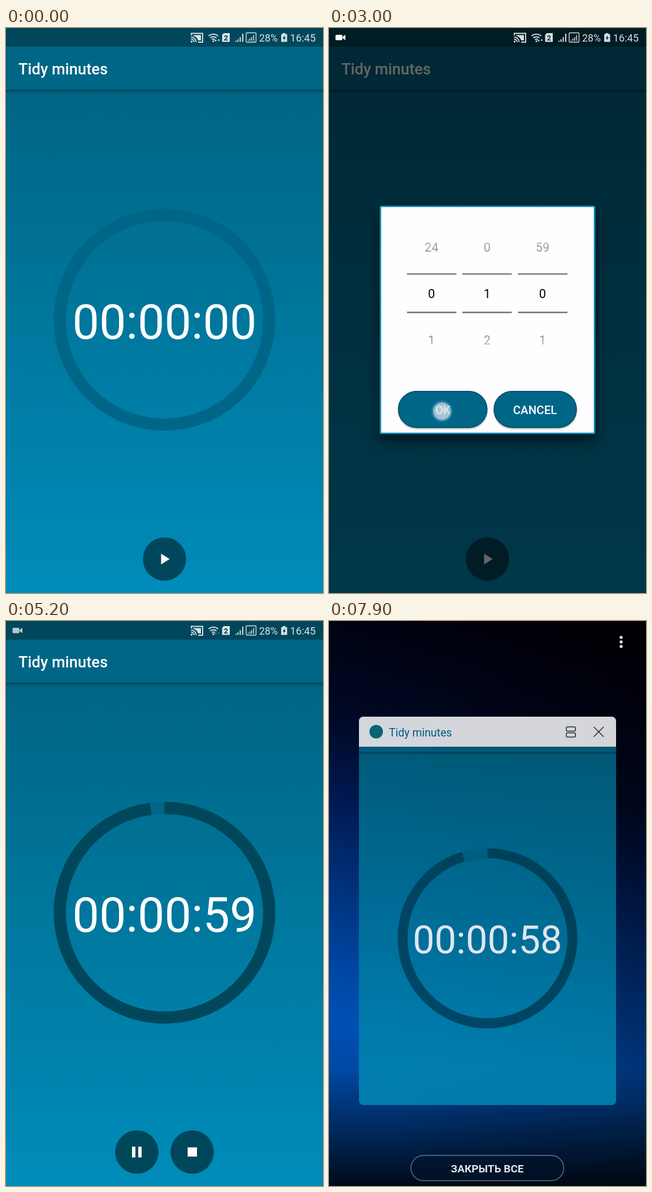
These frames come from a looping animation (561x998 px, 8 s). An HTML page:

```html
<!DOCTYPE html>
<html lang="en">
<head>
<meta charset="utf-8">
<title>Tidy minutes</title>
<style>
html, body { margin: 0; width: 100%; height: 100%; overflow: hidden; background: #000; }
svg { display: block; width: 100vw; height: 100vh; }
text { font-family: Roboto, sans-serif; }
.mid { text-anchor: middle; }
</style>
</head>
<body>
<svg viewBox="0 0 561 998">
  <defs>
    <linearGradient id="sky" x1="0" y1="0" x2="0" y2="1">
      <stop offset="0" stop-color="#006584"/><stop offset="1" stop-color="#008cba"/>
    </linearGradient>
    <linearGradient id="shade" x1="0" y1="0" x2="0" y2="1">
      <stop offset="0" stop-opacity=".4"/><stop offset=".35" stop-opacity=".16"/><stop offset="1" stop-opacity="0"/>
    </linearGradient>
    <linearGradient id="fadeDown" x1="0" y1="0" x2="0" y2="1">
      <stop offset="0" stop-color="#fefdff"/><stop offset="1" stop-color="#fefdff" stop-opacity="0"/>
    </linearGradient>
    <linearGradient id="fadeUp" x1="0" y1="1" x2="0" y2="0">
      <stop offset="0" stop-color="#fefdff"/><stop offset="1" stop-color="#fefdff" stop-opacity="0"/>
    </linearGradient>
    <linearGradient id="wall" gradientUnits="userSpaceOnUse" x1="0" y1="-100" x2="-248" y2="726">
      <stop offset="0" stop-color="#00000a"/><stop offset=".28" stop-color="#000927"/>
      <stop offset=".44" stop-color="#001a54"/><stop offset=".61" stop-color="#003484"/>
      <stop offset=".78" stop-color="#004cb0"/><stop offset=".88" stop-color="#0058c6"/>
      <stop offset="1" stop-color="#0050b4"/>
    </linearGradient>
    <linearGradient id="wallRight">
      <stop offset=".2" stop-opacity="0"/><stop offset="1" stop-opacity=".3"/>
    </linearGradient>
    <linearGradient id="wallLow" x1="0" y1="0" x2="0" y2="1">
      <stop offset="0" stop-opacity="0"/><stop offset=".5" stop-opacity=".42"/><stop offset="1" stop-opacity=".85"/>
    </linearGradient>
    <radialGradient id="dotFill">
      <stop offset="0" stop-color="#dfe6ea" stop-opacity=".8"/><stop offset=".72" stop-color="#cfdde5" stop-opacity=".75"/>
      <stop offset=".8" stop-color="#6fb3da" stop-opacity=".55"/><stop offset="1" stop-color="#4a9ccc" stop-opacity="0"/>
    </radialGradient>
    <filter id="soft" x="-20%" y="-20%" width="140%" height="140%"><feGaussianBlur stdDeviation="11"/></filter>
    <filter id="soft2" x="-20%" y="-20%" width="140%" height="150%"><feGaussianBlur stdDeviation="1.5"/></filter>
    <clipPath id="wheelClip"><rect x="130" y="346" width="300" height="245"/></clipPath>
    <clipPath id="cardClip"><rect x="53" y="169" width="455" height="686" rx="8"/></clipPath>

    <g id="app">
      <rect width="561" height="998" fill="#006584"/>
      <rect y="109" width="561" height="889" fill="url(#sky)"/>
      <rect y="109" width="561" height="8" fill="url(#shade)"/>
      <rect y="33" width="561" height="76" fill="#006685"/>
      <rect width="561" height="33" fill="#00475c"/>
      <text x="22" y="81.500" font-size="27.3" font-weight="500" fill="#fff">Tidy minutes</text>
      <g fill="none" stroke-width="21.5" transform="rotate(-90 280.500 515.300)">
        <circle cx="280.5" cy="515.3" r="185.3" stroke="#006687"/>
        <circle id="arc" cx="280.5" cy="515.3" r="185.3" stroke="#00475c" pathLength="360"/>
      </g>
      <text id="clock" class="mid" x="280.5" y="548.5" font-size="84.5" fill="#fff">00:00:00</text>
      <g id="idle">
        <circle cx="280.5" cy="938" r="38.3" fill="#00475c"/>
        <path d="M274.500 928.500V947.500L289.500 938Z" fill="#fff"/>
      </g>
      <g id="running">
        <circle cx="231.5" cy="938" r="38.3" fill="#00475c"/>
        <circle cx="329.6" cy="938" r="38.3" fill="#00475c"/>
        <path d="M223 928.500h6v19h-6zM234 928.500h6v19h-6zM321.500 929.700h16.400v16.400h-16.400z" fill="#fff"/>
      </g>
    </g>
  </defs>

  <g id="desk">
    <rect width="561" height="998" fill="url(#wall)"/>
    <rect width="561" height="998" fill="url(#wallRight)"/>
    <rect y="790" width="561" height="208" fill="url(#wallLow)"/>
    <g id="home">
      <path d="M258.500 812v-6l4.500-3.800 4.500 3.800v6z" fill="none" stroke="#fff" stroke-width="2"/>
      <circle cx="297.5" cy="807" r="4" fill="#8fa6cc" opacity=".7"/>
      <g id="tiles"></g>
      <g fill="none" stroke="#fff" stroke-width="3.4" stroke-linejoin="round" stroke-linecap="round">
        <path d="M27 887c-1 22 18 46 44 49 4 0 7-3 9-7l-14-11-8 6c-8-4-13-10-16-18l6-8-9-15c-5 0-11 2-12 4z"/>
        <path d="M231 886H180V920M231 900V925H205L182 936"/>
      </g>
      <circle cx="356" cy="907.500" r="32" fill="#d65a45"/>
      <g id="dots" fill="#4d6290"></g>
    </g>
  </g>

  <use id="main" href="#app"/>
  <rect id="dim" width="561" height="998"/>

  <g id="dialog">
    <rect x="88" y="326" width="385" height="404" rx="6" opacity=".5" filter="url(#soft)"/>
    <rect x="91" y="315" width="379" height="401" rx="2" fill="#fefdff" stroke="#078cbd" stroke-width="2.700"/>
    <g id="wheels" class="mid" font-size="21.800" clip-path="url(#wheelClip)"></g>
    <rect x="130" y="346" width="300" height="112" fill="url(#fadeDown)"/>
    <rect x="130" y="479" width="300" height="112" fill="url(#fadeUp)"/>
    <path d="M138 434.500h87.500M236 434.500h87.500M334.500 434.500h87.500M138 502.400h87.500M236 502.400h87.500M334.500 502.400h87.500" stroke="#7c7c7c" stroke-width="2.700"/>
    <g filter="url(#soft2)" opacity=".3">
      <rect x="123" y="644" width="157" height="64" rx="32"/><rect x="292" y="644" width="146" height="64" rx="32"/>
    </g>
    <g fill="#006687" stroke="#00475c" stroke-width="1.500">
      <rect x="122.700" y="641.700" width="157" height="64" rx="32"/>
      <rect x="292" y="641.700" width="146" height="64" rx="32"/>
    </g>
    <g class="mid" font-size="20.500" font-weight="500" fill="#fff">
      <text x="201.500" y="682">OK</text><text x="364.500" y="682">CANCEL</text>
    </g>
  </g>

  <g id="recents">
    <rect width="561" height="998" opacity=".1"/>
    <g clip-path="url(#cardClip)">
      <use href="#app" transform="translate(53 142.500) scale(.811)"/>
      <rect x="53" y="169" width="455" height="53" fill="#f2f3f5"/>
    </g>
    <circle cx="83.500" cy="195.500" r="12" fill="#08727c"/>
    <text x="106" y="203.500" font-size="19.500" fill="#00668a">Tidy minutes</text>
    <g fill="none" stroke="#2e3236" stroke-width="1.600">
      <rect x="420" y="187" width="16" height="7.500" rx="2"/><rect x="420" y="197.500" width="16" height="7.500" rx="2"/>
      <path d="M468.500 187l17.500 17.500M486 187l-17.500 17.500"/>
    </g>
    <g fill="#fff"><circle cx="517" cy="29" r="2.700"/><circle cx="517" cy="37" r="2.700"/><circle cx="517" cy="45" r="2.700"/></g>
    <rect x="145" y="944" width="270.500" height="44.500" rx="22.200" fill="#04142c" fill-opacity=".6" stroke="#6c86a4" stroke-width="1.300"/>
    <text class="mid" x="280" y="973.500" font-size="19" font-weight="700" fill="#fff">ЗАКРЫТЬ ВСЕ</text>
  </g>

  <g id="status" fill="#fff">
    <g id="watch" fill="none" stroke="#fff" stroke-width="1.500" opacity=".6">
      <circle cx="20.500" cy="18" r="6.600"/><path d="M20.500 18v-4M18 9h5M25.500 12l1.500-1.500"/>
    </g>
    <g id="cam"><rect x="11.500" y="12" width="12" height="9.500" rx="1.500"/><path d="M24 15.500l5-3.500v9.500l-5-3.500z"/></g>
    <g opacity=".85">
      <path d="M328 13V9.500h20V25h-8" fill="none" stroke="#fff" stroke-width="1.900"/>
      <path d="M331.500 12.500h13.500v9.500h-5a11 11 0 0 0-8.500-8z"/>
      <path d="M327.500 16a9 9 0 0 1 9 9M327.500 19.500a5.500 5.500 0 0 1 5.500 5.500" fill="none" stroke="#fff" stroke-width="1.800"/>
      <circle cx="328.500" cy="24" r="1.700"/>
      <path d="M358.500 14a13 13 0 0 1 17 0M361.500 17.500a8.500 8.500 0 0 1 11 0M364.500 20.500a4 4 0 0 1 5 0" fill="none" stroke="#fff" stroke-width="1.900"/>
      <circle cx="367" cy="23.300" r="1.600"/>
      <path id="arrows" d="M369 21h4l-2 3.500zM374.500 22.500h4l-2-3.500z"/>
      <path d="M385.500 9H396V24.500H382.500V12z"/>
      <path d="M406 22.500h2v2h-2zM409.500 20h2v4.500h-2zM413.500 16h2v8.500h-2zM418 10h2v14.500h-2z"/>
      <rect x="425" y="8.500" width="17.500" height="16.500" rx="1.500" fill="none" stroke="#fff" stroke-width="1.400"/>
      <path d="M428 20.500h1.500v2H428zM431 18.500h1.500v4H431zM434 16h1.500v6.500H434zM437.500 12.500h1.500v10h-1.500z"/>
      <path d="M489.500 9h5v2h3v13.500h-10.500v-13.500h2.500z"/>
      <path d="M493.500 12.500l-4 6h2.500l-.8 4 4-6h-2.500z" fill="#00384a"/>
      <text x="448" y="23.500" font-size="17.700">28%</text>
      <text x="548" y="23.500" font-size="18.200" text-anchor="end">16:45</text>
    </g>
    <text class="mid" x="389.300" y="21.800" font-size="13" font-weight="700" fill="#003445">2</text>
  </g>
  <circle id="touch" r="20" fill="url(#dotFill)"/>
</svg>
<script>
const $ = id => document.getElementById(id);
const clamp = x => Math.min(1, Math.max(0, x));
const ramp = (t, a, b) => clamp((t - a) / (b - a));
const easeOut = x => 1 - (1 - x) * (1 - x);
const set = (id, name, value) => $(id).setAttribute(name, value);
const fade = (id, a) => {
  set(id, 'opacity', a);
  set(id, 'display', a > 0 ? 'inline' : 'none');
};

const LOOP = 8000, STEP = 100, ROW = 82, START = 3930, TOTAL = 60;

// home screen tiles with labels
$('tiles').innerHTML = [
  ['#0fa876', 'Телефон'], ['#e08e1c', 'Сообщения'], ['#f0f4f7', 'Quorva'], ['#e6edf3', 'Меню']
].map(([color, label], i) => {
  const x = 53.5 + i * 151.3;
  return `<rect x="${x - 43}" y="864.5" width="86" height="86" rx="29" fill="${color}"/>
    <text class="mid" x="${x}" y="981" font-size="21" fill="#fff">${label}</text>`;
}).join('');
for (let i = 0; i < 9; i++)
  $('dots').innerHTML += `<circle cx="${491 + i % 3 * 16.2}" cy="${891.3 + (i / 3 | 0) * 16.2}" r="4.1"/>`;

// number wheels: hours, minutes, seconds
$('wheels').innerHTML = [[181.5, 25], [280, 60], [378, 60]].map(([x, n], col) => {
  let rows = '';
  for (let k = -2; k < 4; k++)
    rows += `<text x="${x}" y="${477 + k * ROW}">${(k + n) % n}</text>`;
  return `<g id="wheel${col}">${rows}</g>`;
}).join('');

// taps and swipe: from, to, x, y at start, y at end
const touches = [
  [1300, 1500, 284, 524, 524],
  [2000, 2400, 282, 548, 478],
  [2900, 3100, 200, 677, 677],
  [3800, 4000, 281, 946, 946]
];

function drawTouch(t) {
  const hit = touches.find(([a, b]) => t >= a && t < b);
  fade('touch', hit ? 1 : 0);
  if (!hit) return;
  const [a, b, x, y0, y1] = hit;
  set('touch', 'cx', x);
  set('touch', 'cy', y0 + (y1 - y0) * ramp(t, a, b - STEP));
}

function drawTimer(t) {
  const left = t < 3050 ? 0 : TOTAL - Math.max(0, Math.min(t, 6700) - START) / 1000;
  const secs = Math.ceil(left), two = n => String(n).padStart(2, '0');
  $('clock').textContent = `00:${two(Math.floor(secs / 60))}:${two(secs % 60)}`;
  const deg = left / TOTAL * 360;
  set('arc', 'stroke-dasharray', deg >= 360 ? 'none' : `${deg} 400`);
  fade('arc', left ? 1 : 0);
  fade('idle', t < START ? 1 : 0);
  fade('running', t < START ? 0 : 1);
}

function drawDialog(t) {
  const show = ramp(t, 1400, 1550), hide = ramp(t, 3030, 3220);
  fade('dialog', show * (1 - hide));
  const s = .9 + .1 * easeOut(show);
  set('dialog', 'transform', `translate(280.5 515.5) scale(${s}) translate(-280.5 -515.5)`);
  fade('dim', .6 * easeOut(ramp(t, 1350, 1750)) * (1 - ramp(t, 3020, 3280)));
  const y = 60 * ramp(t, 2050, 2350) + (ROW - 60) * easeOut(ramp(t, 2350, 2800));
  set('wheel1', 'transform', `translate(0 ${-y})`);
}

function drawScreens(t) {
  const away = t >= 6900;
  const s = 1 - .353 * ramp(t, 6850, 7000);
  fade('main', away ? clamp(1 - (t - 6840) / 185) : 1);
  set('main', 'transform', away ? `translate(280.5 499) scale(${s}) translate(-280.5 -499)` : '');
  const open = t < 7700 ? 0 : clamp((t - 7680) / 250);
  fade('recents', open);
  fade('home', open > .8 ? 0 : ramp(t, 6750, 7060) * (1 - open));
  fade('status', open > .8 ? 0 : 1 - open);
}

function drawStatus(t) {
  const away = t >= 6900;
  fade('watch', away ? .6 : 0);
  fade('cam', ramp(t, 0, 400) * (t > 3100 && !away ? .7 : 1));
  set('cam', 'transform', away ? 'translate(21 0)' : '');
  set('arrows', 'opacity', t < 3100 ? 1 : .35);
}

function draw(t) {
  drawTimer(t);
  drawDialog(t);
  drawScreens(t);
  drawStatus(t);
  drawTouch(t);
}

const begin = performance.now();
function tick() {
  const t = (performance.now() - begin) % LOOP;
  draw(Math.floor(t / STEP) * STEP);
  requestAnimationFrame(tick);
}
draw(0);
requestAnimationFrame(tick);
</script>
</body>
</html>
```
